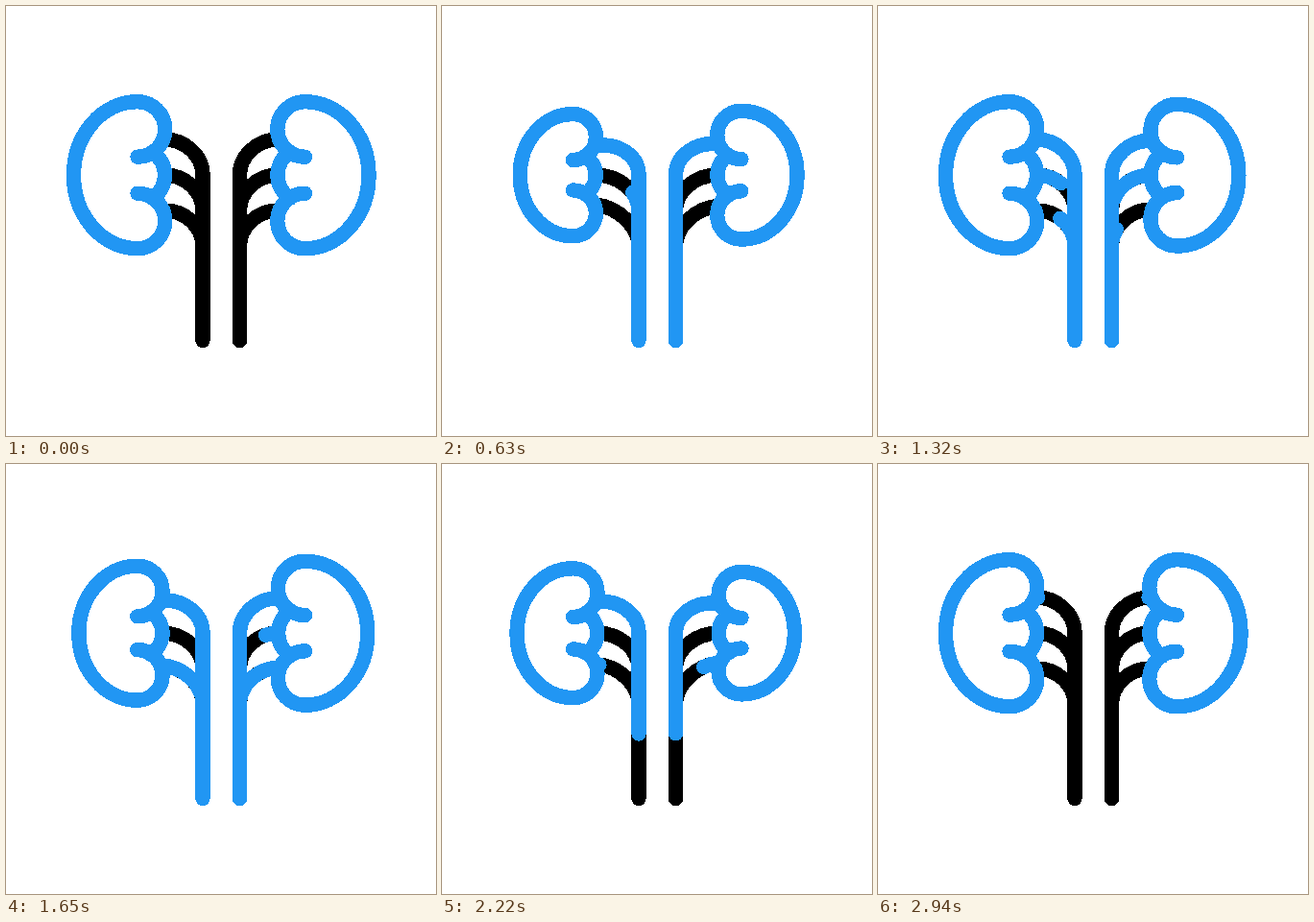
An HTML page for the animation above (3600 ms loop, 448x448 px).

```html
<!DOCTYPE html>
<html lang="en">
<head>
<meta charset="utf-8">
<title>Kidneys</title>
<style>
  html, body { margin: 0; width: 100%; height: 100%; overflow: hidden; background: #fff; }
  svg { display: block; width: 448px; height: 448px; }
  path {
    fill: none; stroke-width: 15.4; stroke-linecap: round; stroke-linejoin: round;
    shape-rendering: crispEdges;
  }
  .vessel { stroke: #000; }
  .flow, .kidney { stroke: #2196f3; }
  .kidney { vector-effect: non-scaling-stroke; }
</style>
</head>
<body>
<svg id="stage" viewBox="0 0 448 448"></svg>
<script>
const LOOP = 3600, STEP = 30, LAST = 2940;
const PULSE = 1320, SHRINK = 0.17;
const CX = 134, CY = 176.2, STEM = 205, FOOT = 348.5;
const GAP = 37, HANDLE = 20.4;
const KIDNEY = `M137 157.2A28.7 28.7 0 0 0 137 99.7A66.5 76.5 0 0 0 137 252.7
  A28.7 28.7 0 0 0 137 195.2M152.4 152.2A28.5 28.5 0 0 1 152.4 200.2`;

// Flow times per branch (top, middle, lower): head start, head end, tail start, tail end
const TRUNK = [0, 550, 1805, 2970];
const SIDES = [
  { delay: 0, flip: '', flows: [TRUNK, [480, 880, 890, 1690], [1080, 1520, 1400, 2310]] },
  { delay: 190, flip: 'translate(448.5 0) scale(-1 1)',
    flows: [TRUNK, [680, 1080, 1090, 1890], [1160, 1600, 1420, 2590]] }
];

const stage = document.getElementById('stage');

function add(parent, tag, attrs) {
  const el = document.createElementNS('http://www.w3.org/2000/svg', tag);
  for (const name in attrs) el.setAttribute(name, attrs[name]);
  return parent.appendChild(el);
}

function ease(t, from, to) {
  const s = Math.min(1, Math.max(0, (t - from) / (to - from)));
  return s * s * (3 - 2 * s);
}

// Two beats, each shrinking and growing back
function beat(t) {
  if (t <= 0 || t >= 2 * PULSE) return 1;
  const p = t % PULSE, half = PULSE / 2;
  return 1 - SHRINK * (p < half ? ease(p, 0, half) : 1 - ease(p, half, PULSE));
}

// Branch i leaves the stem and ends on the kidney, whose scale is k;
// the bend near the kidney follows only half of the movement
function branch(i, k) {
  const endX = s => CX + 32 * s, endY = s => CY + GAP * (i - 1) * s;
  const base = CY + GAP * i, bend = (1 + k) / 2;
  const start = i ? `M${STEM} ${base}` : `M${STEM} ${FOOT}V${base}`;
  return `${start}C${STEM} ${base - HANDLE} ${endX(bend) + HANDLE} ${endY(bend)} ${endX(k)} ${endY(k)}`;
}

for (const side of SIDES) {
  const group = add(stage, 'g', { transform: side.flip });
  side.vessels = side.flows.map(() => add(group, 'path', { class: 'vessel' }));
  side.blues = side.flows.map(() => add(group, 'path', { class: 'flow', pathLength: 1 }));
  side.kidney = add(group, 'path', { class: 'kidney', d: KIDNEY });
}

function draw(t) {
  for (const { delay, flows, vessels, blues, kidney } of SIDES) {
    const k = beat(t - delay);
    kidney.setAttribute('transform',
      `translate(${CX} ${CY}) scale(${k}) translate(${-CX} ${-CY})`);
    flows.forEach(([a, b, c, d], i) => {
      const path = branch(i, k);
      const head = ease(t, a, b), tail = ease(t, c, d), length = head - tail;
      vessels[i].setAttribute('d', path);
      blues[i].setAttribute('d', path);
      blues[i].setAttribute('visibility', length > 0 ? 'visible' : 'hidden');
      blues[i].setAttribute('stroke-dasharray', `${Math.max(length, 0)} 3`);
      blues[i].setAttribute('stroke-dashoffset', -tail);
    });
  }
}

const begin = performance.now();
function tick() {
  const t = (performance.now() - begin) % LOOP;
  draw(Math.min(LAST, Math.floor(t / STEP) * STEP));
  requestAnimationFrame(tick);
}
tick();
</script>
</body>
</html>
```
